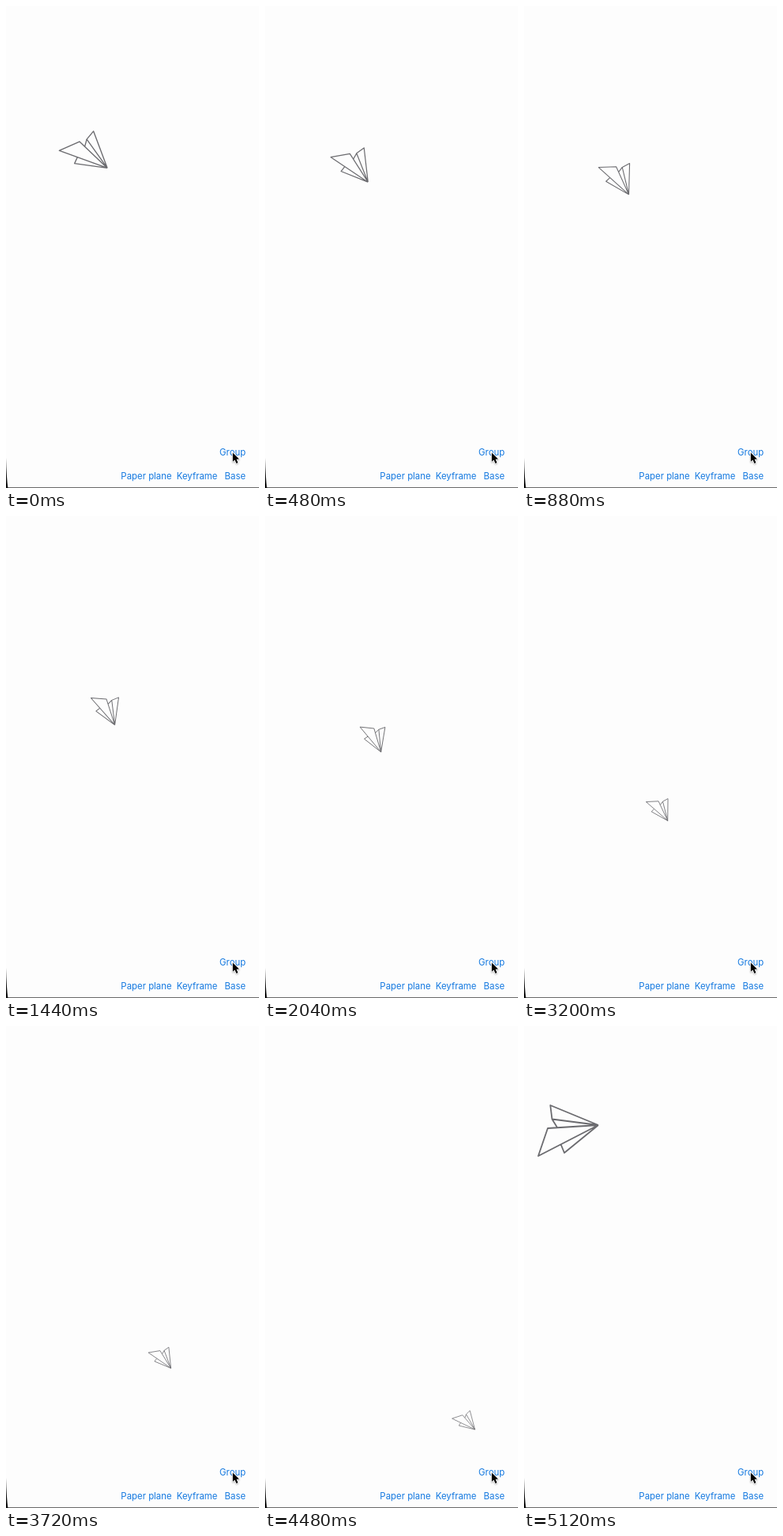
An HTML page with a canvas that plays this animation: 320x608 px, repeating every 5.96 s.

```html
<!DOCTYPE html>
<html lang="en">
<head>
<meta charset="utf-8">
<title>Paper plane</title>
<style>
  html, body { margin: 0; width: 100%; height: 100%; overflow: hidden; background: #fdfdfd; }
  canvas { display: block; width: 320px; height: 608px; }
</style>
</head>
<body>
<canvas id="stage"></canvas>
<script>
const WIDTH = 320, HEIGHT = 608;
const LOOP = 5960, TICK = 40, FLIGHT_END = 5120, CURVE_TIME = 4800;

const canvas = document.getElementById('stage');
const ctx = canvas.getContext('2d');
const ratio = window.devicePixelRatio || 1;
canvas.width = WIDTH * ratio;
canvas.height = HEIGHT * ratio;

const pose = (x, y, angle, scale) => ({ x, y, angle, scale });
const rest = pose(56, 132, 0, 1);

// Control poses of the single Bezier curve that the plane flies along
const flight = [
  pose(104.7, 187, 47, 0.757),
  pose(130.8, 221.3, 87.9, 0.494),
  pose(135.2, 281.6, 88.3, 0.431),
  pose(157.3, 397.8, 58.2, 0.424),
  pose(286.5, 535.3, 50, 0.36)
];

// Corners of the plane, measured from its pivot
const nose = [38, -7];
const foldTop = [-20.5, -14.5];
const wingTail = [-38, 32];
const outlines = [
  [nose, [-22.7, -32], foldTop, nose],
  [foldTop, [-14, -4]],
  [nose, [-26, -3], wingTail, nose],
  [[-9.3, 17.5], [-5, 28], nose]
];

const cursor = [[0, 0], [0, 11.4], [2.6, 9], [4.6, 13.5], [6.6, 12.6], [4.7, 8.3], [8.1, 8.2]];

const mix = (a, b, u) => a + (b - a) * u;

function mixPoses(a, b, u) {
  return pose(mix(a.x, b.x, u), mix(a.y, b.y, u), mix(a.angle, b.angle, u), mix(a.scale, b.scale, u));
}

// De Casteljau: blend neighbours until one pose is left
function bezier(poses, u) {
  if (poses.length === 1) return poses[0];
  return bezier(poses.slice(1).map((next, i) => mixPoses(poses[i], next, u)), u);
}

function trace(points) {
  points.forEach(([x, y], i) => i ? ctx.lineTo(x, y) : ctx.moveTo(x, y));
}

function drawPlane({ x, y, angle, scale }) {
  ctx.save();
  ctx.translate(x, y);
  ctx.rotate(angle * Math.PI / 180);
  ctx.scale(scale, scale);
  ctx.beginPath();
  outlines.forEach(trace);
  ctx.lineWidth = 1.8;
  ctx.lineJoin = 'round';
  ctx.strokeStyle = '#6b6b6f';
  ctx.stroke();
  ctx.restore();
}

function drawLabels() {
  ctx.font = '11.4px Inter, sans-serif';
  ctx.textAlign = 'center';
  ctx.fillStyle = '#1479e0';
  ctx.fillText('Group', 286.6, 566.7);
  ctx.fillText('Paper plane', 177.5, 596.5);
  ctx.fillText('Keyframe', 241.6, 596.5);
  ctx.fillText('Base', 289.8, 596.5);
}

function drawCursor() {
  ctx.save();
  ctx.translate(286.8, 563.4);
  ctx.beginPath();
  trace(cursor);
  ctx.closePath();
  ctx.lineWidth = 1.5;
  ctx.lineJoin = 'round';
  ctx.strokeStyle = '#fff';
  ctx.shadowColor = 'rgba(0, 0, 0, 0.3)';
  ctx.shadowBlur = 2 * ratio;
  ctx.shadowOffsetY = ratio;
  ctx.stroke();
  ctx.shadowColor = 'transparent';
  ctx.fillStyle = '#000';
  ctx.fill();
  ctx.restore();
}

function drawScreenEdge() {
  ctx.fillStyle = '#6a6a6a';
  ctx.fillRect(0, 607, WIDTH, 1);
  ctx.beginPath();
  ctx.moveTo(0, 570);
  ctx.quadraticCurveTo(0.7, 596, 2.5, 608);
  ctx.lineTo(0, 608);
  ctx.fillStyle = '#111';
  ctx.fill();
}

function render(now) {
  const time = Math.floor((now % LOOP) / TICK) * TICK;
  ctx.setTransform(ratio, 0, 0, ratio, 0, 0);
  ctx.fillStyle = '#fdfdfd';
  ctx.fillRect(0, 0, WIDTH, HEIGHT);
  drawPlane(time < FLIGHT_END ? bezier(flight, time / CURVE_TIME) : rest);
  drawScreenEdge();
  drawLabels();
  drawCursor();
}

let start;
function loop(now) {
  start ??= now;
  render(now - start);
  requestAnimationFrame(loop);
}
render(0);
requestAnimationFrame(loop);
</script>
</body>
</html>
```
